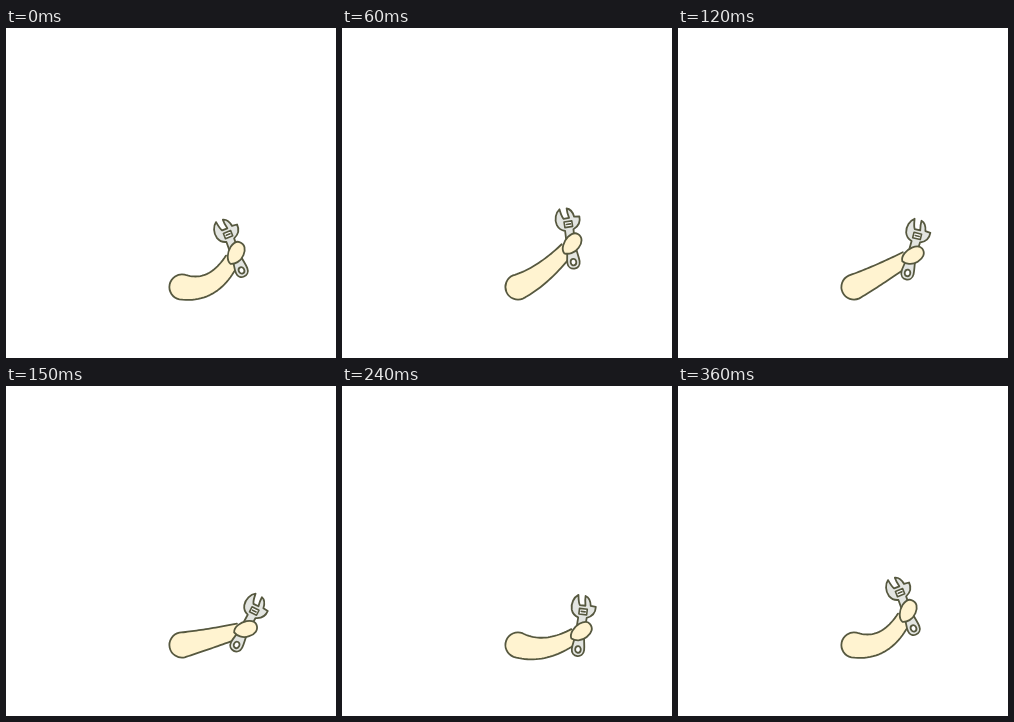
Animation, 330 px wide and 330 px high, one loop 480 ms. Source, as an HTML page with a canvas:

```html
<!DOCTYPE html>
<html lang="en">
<head>
<meta charset="utf-8">
<title>Arm with wrench</title>
<style>
  html, body { margin: 0; width: 100%; height: 100%; overflow: hidden; background: #fff; }
  canvas { display: block; width: 330px; height: 330px; }
</style>
</head>
<body>
<canvas id="stage" width="330" height="330"></canvas>
<script>
const ctx = document.getElementById('stage').getContext('2d');
const LINE = '#56583f', SKIN = '#fff3d0', STEEL = '#e3e5e1';
const STEP = 30, LOOP = 480, MOVE = 360;
const SHOULDER = { x: 176, y: 259, r: 12.6 }, WRIST_R = 7.4;

const steel = new Path2D(`M-3.5 -32 C-7 -33 -9.5 -35 -10.8 -39 C-12.5 -45 -10 -51.5 -5.8 -54.3
  C-5.2 -50 -5 -47 -3.2 -44.3 H2.4 C1.6 -48 1.2 -51 1.4 -54 C5 -53 7 -49 7.6 -44.8
  L12.8 -44.3 C13.2 -39 10.2 -34.5 5 -32.5 L4.2 -18 C4.5 -10 6.2 -5 6.2 0
  C6.2 8.8 -6.2 8.8 -6.2 0 C-6.2 -5 -4 -10 -4 -18 Z`);
const screw = new Path2D('M-3.2 -41 H4.6 V-35.4 H-3.2 Z M-1.2 -38.2 H2.8');
const fist = new Path2D(`M0 -11.5 C6 -11.5 8.5 -6 7.7 0 C7.2 7 2 11 -2 12
  C-7 10 -8.5 2 -7 -4 C-5.5 -9 -3 -11.5 0 -11.5 Z`);
const hole = new Path2D();
hole.ellipse(0, 0, 2.8, 3.3, 0, 0, 2 * Math.PI);

const rad = deg => deg * Math.PI / 180;

// Mean plus cosine and sine amplitudes of each harmonic in turn
const wave = (phase, mean, ...amps) => amps.reduce((sum, amp, i) =>
  sum + amp * (i % 2 ? Math.sin : Math.cos)(phase * ((i >> 1) + 1)), mean);

function paint(path, fill) {
  ctx.fillStyle = fill;
  ctx.fill(path);
  ctx.stroke(path);
}

// Tapered tube along a quadratic curve, rounded at the shoulder and open at the wrist
function drawArm(wx, wy, bend) {
  const { x, y, r } = SHOULDER;
  const dx = wx - x, dy = wy - y, len = Math.hypot(dx, dy);
  const qx = x + dx * 0.42 - dy / len * bend, qy = y + dy * 0.42 + dx / len * bend;
  const arm = new Path2D();
  const edge = (t, side) => {
    const s = 1 - t;
    const a = Math.atan2(s * (qy - y) + t * (wy - qy), s * (qx - x) + t * (wx - qx));
    const w = side * (r + (WRIST_R - r) * t);
    arm.lineTo(s * s * x + 2 * s * t * qx + t * t * wx - w * Math.sin(a),
               s * s * y + 2 * s * t * qy + t * t * wy + w * Math.cos(a));
  };
  const n = 24, start = Math.atan2(qy - y, qx - x);
  for (let i = n; i >= 0; i--) edge(i / n, -1);
  arm.arc(x, y, r, start - Math.PI / 2, start + Math.PI / 2, true);
  for (let i = 0; i <= n; i++) edge(i / n, 1);
  paint(arm, SKIN);
}

function drawWrench() {
  ctx.save();
  ctx.translate(-1.3, 18.2);
  paint(steel, STEEL);
  paint(hole, '#fff');
  ctx.lineWidth = 1.6;
  paint(screw, '#fff');
  ctx.restore();
}

function draw(now) {
  const t = now % LOOP;
  const phase = t < MOVE ? Math.floor(t / STEP) * STEP / MOVE * 2 * Math.PI : 0;
  const x = wave(phase, 235.4, -5.9, -2.7, 1.1, -0.2, -0.6);
  const y = wave(phase, 234, -13.2, -11, 5.5, -0.6, -1.3);
  const tilt = rad(wave(phase, 1.9, -23.7, 2, 2.5, -2, -2.4));
  const bend = wave(phase, 11, 8, -7.7, 0.7, -0.3, 1.1);
  const grip = tilt + rad(39), sin = Math.sin(grip), cos = Math.cos(grip);

  ctx.clearRect(0, 0, 330, 330);
  ctx.strokeStyle = LINE;
  ctx.lineWidth = 1.8;
  ctx.lineJoin = ctx.lineCap = 'round';
  drawArm(x - 1.5 * cos - 7 * sin, y - 1.5 * sin + 7 * cos, bend);
  ctx.save();
  ctx.translate(x, y);
  ctx.rotate(tilt);
  drawWrench();
  ctx.rotate(grip - tilt);
  paint(fist, SKIN);
  ctx.restore();
}

let start;
function tick(now) {
  start ??= now;
  draw(now - start);
  requestAnimationFrame(tick);
}
draw(0);
requestAnimationFrame(tick);
</script>
</body>
</html>
```
